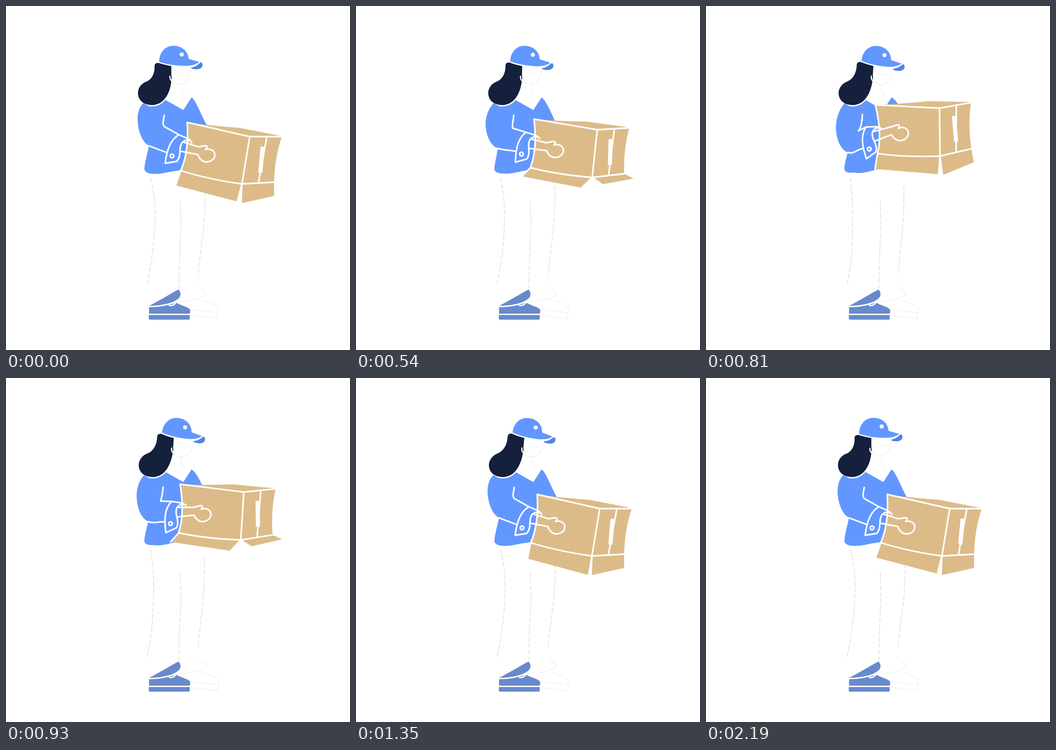
These frames come from a looping animation (748x748 px, 2.22 s). An HTML page:

```html
<!DOCTYPE html>
<html lang="en">
<head>
<meta charset="utf-8">
<title>Courier with a box</title>
<style>
  html, body { margin: 0; width: 100%; height: 100%; overflow: hidden; background: #fff; }
  svg { display: block; width: 100%; height: 100%; }
  path, circle { stroke-linecap: round; stroke-linejoin: round; fill: none; }
  .blue { fill: #6297ff; }
  .tan { fill: #dcbb89; }
  .navy { fill: #15203c; }
  .shoe { fill: #688acc; }
  .bill { fill: #5084e4; }
  .edge { stroke: #fff; stroke-width: 3.4; }
  .halo { stroke: #fff; stroke-width: 6; paint-order: stroke; }
  .thin { stroke-width: 2.8; }
  .faint { stroke: #ececec; stroke-width: 1.2; }
  .leg { stroke: #cacaca; stroke-width: 1; stroke-dasharray: 9 5; }
</style>
</head>
<body>
<svg viewBox="0 0 748 748">
  <path id="legs" class="leg"/>
  <path class="faint" d="M417 608 C425 618 437 621 435 628 C420 640 390 643 370 643 M425 640 C445 645 462 652 462 660 V667 L400 660 M400 673 L460 680 V667"/>
  <path class="shoe" d="M311 652 C335 640 355 627 375 616.500 C380 621 381 629 377 634 C365 648 330 652 311 652Z"/>
  <path class="shoe" d="M311 655 C335 655 356 650 370 645 C382 652 396 654 400 660 C401 664 401 667 399 669 H311Z"/>
  <path class="shoe" d="M310.500 672 H399.500 V680 Q399 682 397 682 H313 Q311 682 310.500 680Z"/>
  <path class="edge thin" d="M355 651 C362 653 367 649 371 643"/>

  <path id="torso" class="blue"/>
  <path class="edge" d="M348 203 L385 224 L402 198"/>
  <path id="hair" class="navy halo"/>
  <path class="faint" d="M381 171 C381 182 384 190 388 195"/>
  <g id="head">
    <path class="faint" style="fill:#fff" d="M360 129 V150 C362 165 370 171 379 170 C393 168 399 158 401 145 L404 132"/>
    <path class="faint" d="M371 146 Q376 148 381 147 M386 147 Q391 148 396 146"/>
    <path class="edge thin" d="M356.500 153 C356 159 359 163 363 164"/>
    <path class="bill" d="M403 134 C412 132 418 128 422 122 C428 122 429 130 425 134 C420 139 410 138 403 136Z"/>
    <path class="blue" d="M333 122 C333 100 347 86.500 364 86.500 C382 86.500 396 98 397 115 L422 122 C412 130 397 132 385 131 C365 130 348 127 333 122Z"/>
    <path class="edge thin" d="M332 122.500 C348 128 365 131 385 131.500 C397 132 412 131 422 122"/>
    <circle cx="382" cy="105.500" r="4.500" style="fill:#fff"/>
  </g>

  <g id="box">
    <path id="flaps" class="tan"/>
    <path class="tan" d="M394 253 Q450 261 508 265 L600 283 Q584 330 583 383 L513 387 Q440 377 380 358 Q398 318 394 253Z"/>
    <path class="edge" d="M394 253 L530 284 H600 M530 284 L513 387 M567 285 L549 384 M583 383 L513 387 Q440 377 380 358 Q398 318 394 253"/>
    <path id="flapEdges" class="edge"/>
    <path class="edge" style="stroke-width:9;stroke-linecap:butt" d="M558 306 L553 362"/>
    <path class="edge" d="M418 306 C426 306 430 303 435 304 C439 306 437 309 434 312 C445 309 454 315 454 324 C454 333 445 339 436 339 C427 339 421 333 417 323"/>
  </g>
  <path id="wrist" class="edge"/>
  <path id="arm" class="blue"/>
  <path id="folds" class="edge"/>
  <g id="cuff">
    <path class="blue" d="M376 280 C358 290 350 312 346 342 L371 338 C383 326 374 308 383 297Z"/>
    <path class="edge" d="M376 280 C358 290 350 312 346 342 L371 338 C383 326 374 308 383 297 Q389 290 398 293 M376 280 C385 284 402 290 404 297"/>
    <circle class="edge" cx="361" cy="326" r="4"/>
  </g>
</svg>
<script>
const LOOP = 2220;
const el = id => document.getElementById(id);
const put = (id, d) => el(id).setAttribute('d', d);

// time, lift, box turn, elbow shift x and y
const lifts = [[0, 0, 0, 0, 0], [280, 62, 8.8, -9.4, 8], [540, 15, 3.3, -5, 6],
  [810, 62, 10, -4, 16], [1080, 0, 0, 0, 0], [LOOP, 0, 0, 0, 0]];
// time, flap angle in radians
const HANG = .47;
const swings = [[0, HANG], [380, HANG], [500, 1.15], [690, .3], [810, HANG], [990, 1.24],
  [1250, 0], [1440, HANG], [1680, 0], [LOOP, HANG]];
const tilts = [[0, 0], [150, 0], [1200, 1], [1500, 1], [2210, 0], [LOOP, 0]];

function at(track, t) {
  const i = track.findIndex(k => k[0] > t);
  const a = track[i - 1], b = track[i];
  const u = (1 - Math.cos(Math.PI * (t - a[0]) / (b[0] - a[0]))) / 2;
  return a.slice(1).map((v, n) => v + (b[n + 1] - v) * u);
}

// A rigid part: turns about a pivot, then shifts.
function joint(px, py, deg, dx, dy) {
  const c = Math.cos(deg * Math.PI / 180), s = Math.sin(deg * Math.PI / 180);
  return {
    attr: `translate(${dx} ${dy}) rotate(${deg} ${px} ${py})`,
    at: (x, y) => [px + dx + (x - px) * c - (y - py) * s, py + dy + (x - px) * s + (y - py) * c]
  };
}

function drawHead(tilt) {
  el('head').setAttribute('transform', `rotate(${5.5 * tilt} 364 198)`);
  // Hair follows the head at the top and hangs still below.
  const h = (x, y) => {
    const w = Math.min(1, Math.max(0, (180 - y) / 54));
    return `${x + tilt * (2 + 5 * w)} ${y - tilt * 3 * w} `;
  };
  put('hair', `M${h(324, 126)}C${h(330, 121)}${h(345, 124)}${h(361, 129)}
    C${h(360, 150)}${h(362, 175)}${h(350, 195)}C${h(340, 212)}${h(325, 217)}${h(312, 215)}
    C${h(296, 213)}${h(286, 202)}${h(287, 187)}C${h(288, 176)}${h(296, 168)}${h(304, 165)}
    C${h(318, 160)}${h(324, 145)}${h(323, 130)}Z`);
}

function drawFlaps(a) {
  const b = Math.max(0, 2 * (a - HANG));
  const out = 1 - Math.cos(b);
  const left = [378 - 20 * Math.sin(a), 358 + 36 * Math.cos(a)];
  const mid = [507 - 36 * (1 - Math.cos(a)), 387 + 43 * Math.cos(a)];
  const near = [511 + 36 * out, 387 + 42 * Math.cos(b)];
  const far = [583 + 32 * out, 383 + 30 * Math.cos(b)];
  put('flaps', `M380 358 Q440 377 513 387 L${mid} L${left}Z M513 387 L583 383 L${far} L${near}Z`);
  put('flapEdges', `M380 358 L${left} M513 387 L${mid} M513 387 L${near}`);
}

function drawBody(lift, turn, ex, ey) {
  const k = lift / 62, bend = .43 * lift;
  const box = joint(530, 284, -turn, -.36 * lift, -lift);
  const cuff = joint(346, 342, -bend, .045 * lift, -.16 * lift);
  el('box').setAttribute('transform', box.attr);
  el('cuff').setAttribute('transform', cuff.attr);
  put('wrist', `M${cuff.at(386, 296)} L${box.at(418, 306)} M${cuff.at(381, 316)} L${box.at(417, 323)}`);

  const low = [311 + .6 * ex, 304 + .9 * ey];
  put('torso', `M348 203 L385 224 L402 198 C412 202 ${422 + 8 * k} ${232 - 6 * k} 437 260
    L380 ${357 - 4 * k} C352 360 340 366 320 ${365 - 3 * k} C304 364 300 358 301 352
    C302 340 308 318 ${low} L299 211Z`);

  const crease = [344 - .48 * bend, 262 + .6 * ey];
  const under = `C${low[0] + 12} ${low[1] + 5} ${cuff.at(338, 314)} ${cuff.at(350, 319)}`;
  const inner = `L${crease} C${crease[0] - 5 + .4 * bend} ${crease[1] - 6}
    ${343 - 3 * k} ${248 + 2 * k} ${344 - 4 * k} ${238 - 2 * k}`;
  const top = cuff.at(376, 280);
  put('arm', `M${299 + 2 * k} 211 C288 ${220 + .5 * ey} ${284 + .8 * ex} ${240 + .5 * ey} ${287 + ex} ${258 + ey}
    C${290 + ex} ${282 + ey} ${300 + ex} ${298 + ey} ${low} ${under} L${top} ${inner}Z`);
  put('folds', `M${low} ${under} M${top} ${inner}`);

  put('legs', `M314 374 C${324 - 6 * k} 410 ${326 - 6 * k} 450 ${323 - 5 * k} 490 C320 540 312 580 307 605
    M379 424 C380 455 381 480 379 510 C377 550 376 585 376 614
    M${433 - 3 * k} 390 C${434 - 3 * k} 440 ${431 - 2 * k} 475 ${426 - 2 * k} 515 C421 550 418 575 418 586`);
}

const start = performance.now();
function tick() {
  const t = (performance.now() - start) % LOOP;
  drawHead(at(tilts, t)[0]);
  drawFlaps(at(swings, t)[0]);
  drawBody(...at(lifts, t));
  requestAnimationFrame(tick);
}
tick();
</script>
</body>
</html>
```
